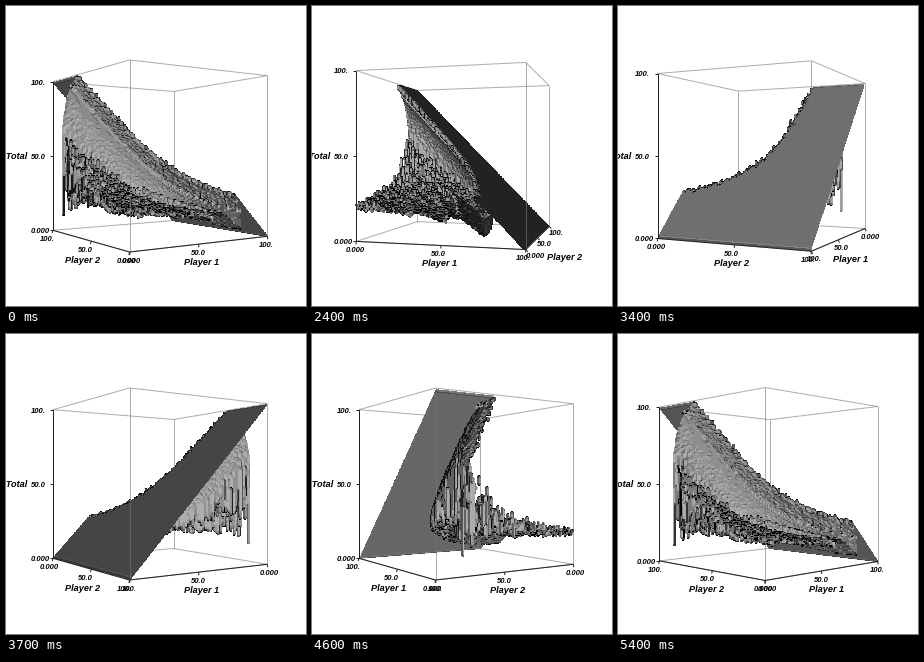
Animation, 300 px wide and 300 px high, one loop 5500 ms. Source, as a matplotlib script:

```python
import numpy as np
import matplotlib.pyplot as plt
from matplotlib.animation import FuncAnimation
from matplotlib.collections import LineCollection

SIZE, DPI = 300, 100
GOAL = 100
DIST, FOCAL = 3.536, 545.8      # camera distance in box sides, focal length in px
START, STEP = 236.2, 10         # camera azimuth and turn per step, degrees
HOLD_FRAMES, FRAMES = 19, 55
GREY = 175
NAMES = ("Player 1", "Player 2", "Turn Total")
HALF_W = (17.5, 17.5, 22)
TICKS = ((0, "0.000"), (0.5, "50.0"), (1, "100."))
LABEL_W, LABEL_H, TICK, LEAD = 19, 7, 3, 3.5


def solve_pig(sweeps=100):
    """Slightly noisy roll/hold policy of the dice game Pig, indexed [i, j, k]."""
    win = np.ones((GOAL + 7, GOAL, GOAL))
    win[0] = 0.5
    noise = np.random.default_rng(4).normal(size=(GOAL, GOAL))
    policy = np.zeros((GOAL,) * 3, bool)
    for _ in range(sweeps):
        passed = 1 - win[0].T
        for k in range(GOAL - 1, -1, -1):
            n = GOAL - k
            roll = (passed[:n] + win[k + 2:k + 7, :n].sum(axis=0)) / 6
            hold = passed[k:]
            win[k, :n] = np.maximum(roll, hold)
            # more caution when the next roll can win
            near = np.arange(n)[:, None] + k >= GOAL - 6
            caution = np.where(near, 1.2 + 0.05 * noise[:n], 1 + 0.004 * noise[:n])
            policy[:n, :, k] = 1 - hold > caution * (1 - roll)
    return policy


def boundary(mask):
    """Points and normals on the surface between roll and hold states."""
    field = mask.astype(np.float32)
    grad = np.stack(np.gradient(field), axis=-1)
    points, normals = [], []
    for axis in range(3):
        unit = np.eye(3, dtype=int)[axis]
        low = np.argwhere(np.diff(field, axis=axis) != 0)
        high = low + unit
        points.append(low + unit / 2)
        normals.append(grad[tuple(low.T)] + grad[tuple(high.T)])
    points, normals = np.concatenate(points), np.concatenate(normals)
    length = np.linalg.norm(normals, axis=1, keepdims=True)
    return points / GOAL - 0.5, normals / np.maximum(length, 1e-6)


POINTS, NORMALS = boundary(solve_pig())
RING = np.array([(-1, -1), (1, -1), (1, 1), (-1, 1)]) / 2
BOTTOM = np.column_stack([RING, np.full(4, -0.5)])
TOP = BOTTOM + (0, 0, 1)
EDGES = [e for n in range(4) for e in (
    (BOTTOM[n], BOTTOM[(n + 1) % 4]), (TOP[n], TOP[(n + 1) % 4]), (BOTTOM[n], TOP[n]))]


def project(p, eye):
    p = np.asarray(p)
    depth = DIST - p[..., 0] * eye[0] - p[..., 1] * eye[1]
    x = SIZE / 2 + FOCAL * (p[..., 1] * eye[0] - p[..., 0] * eye[1]) / depth
    y = SIZE / 2 - FOCAL * p[..., 2] / depth
    return np.stack([x, y], axis=-1), depth


def render(eye):
    """Headlight shading, painted from back to front."""
    xy, depth = project(POINTS, eye)
    order = np.argsort(-depth)
    shade = GREY * np.abs(NORMALS[:, :2] @ eye)[order]
    col, row = np.floor(xy[order] - 0.5).astype(int).T
    cols = np.clip(col[:, None] + (0, 1, 0, 1), 0, SIZE - 1)
    rows = np.clip(row[:, None] + (0, 0, 1, 1), 0, SIZE - 1)
    img = np.full((SIZE, SIZE), np.nan)
    img[rows.ravel(), cols.ravel()] = np.repeat(shade, 4)
    return img


def outer_edges(eye):
    """Pick the three box edges that carry the axes."""
    xy, depth = project(BOTTOM, eye)
    n = np.argmin(np.hypot(xy[:, 0], SIZE - xy[:, 1]))
    after, opposite, before = (n + 1) % 4, (n + 2) % 4, n - 1
    edges = [(BOTTOM[n], BOTTOM[after])]
    if xy[before, 0] < xy[n, 0]:
        edges += [(BOTTOM[n], BOTTOM[before]), (BOTTOM[after], TOP[after])]
    else:
        edges.append((BOTTOM[n], TOP[n]))
        if depth[opposite] < depth[before]:
            edges.append((BOTTOM[after], BOTTOM[opposite]))
        else:
            edges.append((TOP[n], TOP[before]))
    return edges


def in_front(edge, eye):
    a, b = edge
    return any(a[m] == b[m] and a[m] * eye[m] * DIST > 0.25 for m in (0, 1))


fig = plt.figure(figsize=(SIZE / DPI, SIZE / DPI), dpi=DPI, facecolor="white")
ax = fig.add_axes((0, 0, 1, 1))
ax.set_axis_off()
picture = ax.imshow(np.zeros((SIZE, SIZE)), cmap="gray", vmin=0, vmax=255, zorder=2,
                    extent=(0, SIZE, SIZE, 0), interpolation="nearest", aspect="auto")
ax.set_xlim(0, SIZE)
ax.set_ylim(SIZE, 0)


def line_layer(color, z, alpha=1):
    layer = LineCollection([], colors=color, linewidths=72 / DPI, alpha=alpha, zorder=z)
    return ax.add_collection(layer, autolim=False)


def make_text(px, ha):
    return ax.text(0, 0, "", ha=ha, va="baseline", fontsize=px * 72 / DPI, color="black",
                   family="Liberation Sans", weight="bold", style="italic", zorder=5)


back = line_layer("#777777", 1, 0.6)
front = line_layer("#777777", 3, 0.6)
axes_lines = line_layer("#222222", 4)
labels = [[make_text(7.6, "left") for _ in TICKS] for _ in NAMES]
titles = [make_text(9.1, "center") for _ in NAMES]


def place_axis(edge, eye):
    """Set the texts of one axis and return its line and ticks."""
    m = int(np.argmax(np.abs(edge[1] - edge[0])))
    start, end = project(sorted(edge, key=lambda p: p[m]), eye)[0]
    along = (end - start) / np.linalg.norm(end - start)
    out = np.array([-along[1], along[0]])
    middle = (start + end) / 2
    if out @ (middle - SIZE / 2) < 0:
        out = -out

    segments = [(start, end)]
    for (t, value), label in zip(TICKS, labels[m]):
        p = start + t * (end - start)
        segments.append((p, p + TICK * out))
        x, y = p + out * (LABEL_W / 2 + LEAD, LABEL_H / 2 + LEAD + 1)
        label.set_text(value)
        label.set_position((x - LABEL_W / 2, y + 2.8))

    gap = LEAD + 1.2 * np.hypot(LABEL_H * out[1], LABEL_W * out[0])
    x, y = middle + out * (HALF_W[m] + gap, 5.5 + gap)
    titles[m].set_text(NAMES[m])
    titles[m].set_position((x, y + 3.3))
    return segments


def update(frame):
    angle = np.radians(START + STEP * max(0, frame - HOLD_FRAMES))
    eye = np.array([np.cos(angle), np.sin(angle)])
    picture.set_data(np.ma.masked_invalid(render(eye)))
    layers = {True: [], False: []}
    for edge in EDGES:
        layers[in_front(edge, eye)].append(project(edge, eye)[0])
    front.set_segments(layers[True])
    back.set_segments(layers[False])
    axes_lines.set_segments([s for e in outer_edges(eye) for s in place_axis(e, eye)])
    return []


anim = FuncAnimation(fig, update, frames=FRAMES, interval=100, repeat=True, blit=False)
plt.show()
```
